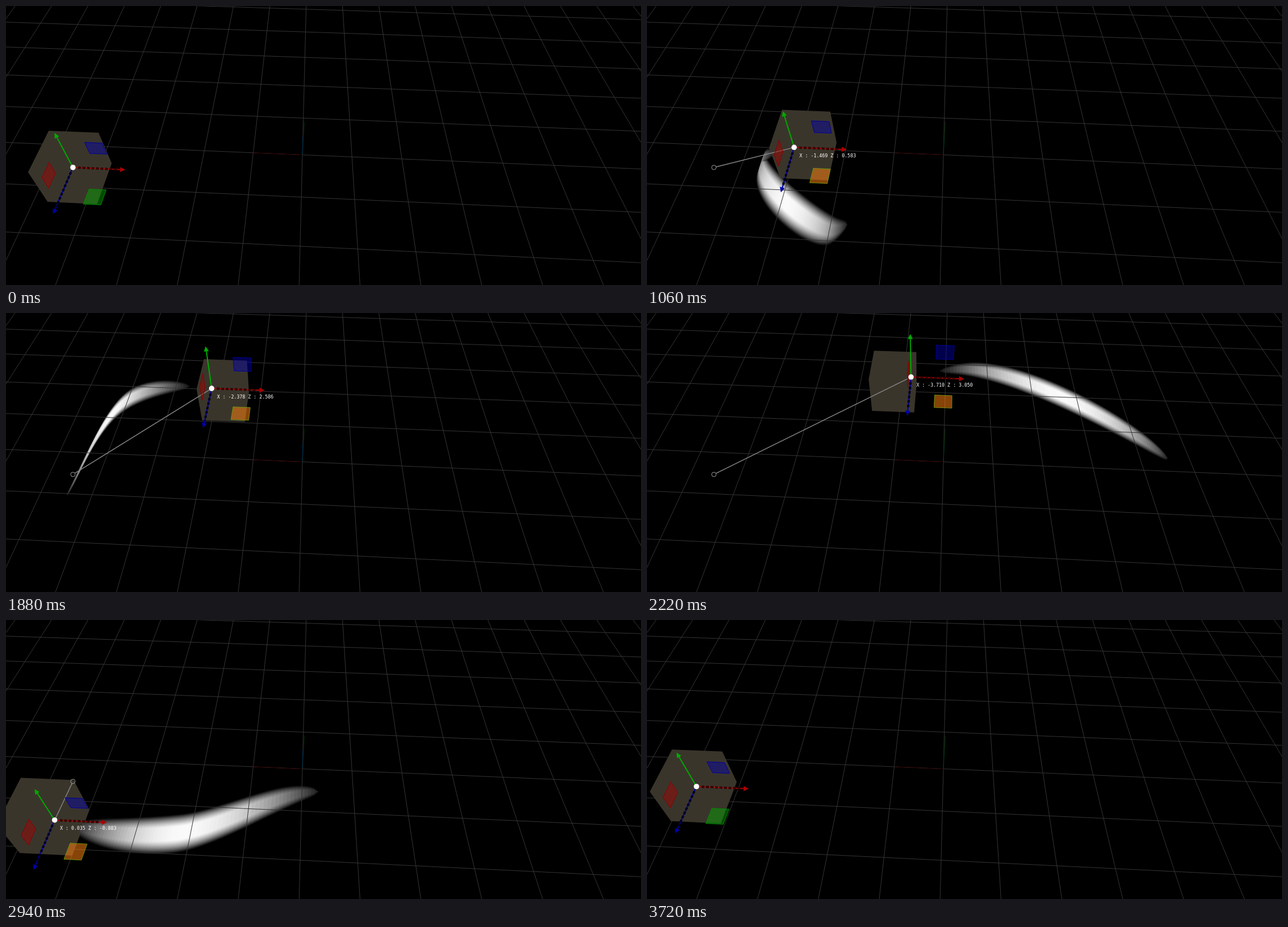
An HTML page with a canvas that plays this animation: 1129 px wide and 496 px high, repeating every 4.38 s.

```html
<!DOCTYPE html>
<html lang="en">
<head>
<meta charset="utf-8">
<title>Dragging a cube</title>
<style>
html, body { margin: 0; width: 100%; height: 100%; overflow: hidden; background: #000; }
canvas { display: block; }
</style>
</head>
<body>
<canvas id="stage" width="1129" height="496"></canvas>
<script>
const ctx = document.getElementById('stage').getContext('2d');
const LOOP = 4380, GRAB = 500, DROP = 3720;
const LEAD = 8, TRAIL_FROM = 15, TRAIL_TO = 150;

// Camera: screen centre, focal length, and world axes in camera space
const CX = 487, CY = 192, FOCAL = 851.5;
const ORIGIN = [.4541, .824, 9.665];
const RIGHT = [.9951, .0387, -.0347];
const UP = [.0006, -.6764, -.7365];
const FAR = [.0518, -.7355, .6756];
const START = [-4.5317, -.5515];

// Turning points of the drag: time, shift right, shift away from the viewer
const KEYS = [
  [500, 0, 0], [570, -.2, 1.87], [630, .45, 2.5], [720, 2.726, 1.997],
  [810, 3.6, .7], [930, 2.6, -1.24], [1040, 1.04, .4], [1240, 7.98, 1.64],
  [1320, 8.27, .7], [1380, 8.198, -.296], [1480, 6.3, -1.1], [1660, .05, -.84],
  [1730, .05, -.455], [1815, .51, 2.09], [1880, 2.378, 2.586], [2050, 9.1, .7],
  [2190, 5, 3.4], [2320, -.9, .5], [2390, -1.19, 1.34], [2480, 1.9, 1.5],
  [2540, 4.736, -.093], [2670, 8.2, -.7], [2790, 4.84, .01], [2860, 2.3, -1.03],
  [2940, -.035, -.883], [3010, -.8, 0], [3210, 7, 2.9], [3320, 9.6, 1.5],
  [3430, 6.3, -1.3], [3590, 0, -.73], [3720, -.3, -.138]
];

function depthAt(r, u, f) {
  return ORIGIN[2] + r * RIGHT[2] + u * UP[2] + f * FAR[2];
}

function project(r, u, f) {
  const axis = i => ORIGIN[i] + r * RIGHT[i] + u * UP[i] + f * FAR[i];
  const scale = FOCAL / depthAt(r, u, f);
  return [CX + axis(0) * scale, CY + axis(1) * scale];
}

// Smooth curve through the keys, with speed taken from the neighbours
function shiftAt(t) {
  const last = KEYS.length - 1;
  if (t <= GRAB) return [0, 0];
  if (t >= DROP) return KEYS[last].slice(1);
  const i = KEYS.findIndex(k => k[0] > t) - 1;
  const p = KEYS[i], q = KEYS[i + 1];
  const before = KEYS[Math.max(0, i - 1)], after = KEYS[Math.min(last, i + 2)];
  const span = q[0] - p[0], s = (t - p[0]) / span;
  return [1, 2].map(c => {
    const m0 = (q[c] - before[c]) / (q[0] - before[0]) * span;
    const m1 = (after[c] - p[c]) / (after[0] - p[0]) * span;
    const d = q[c] - p[c];
    return p[c] + s * (m0 + s * (3 * d - 2 * m0 - m1 + s * (m0 + m1 - 2 * d)));
  });
}

function placeAt(t) {
  const [r, f] = shiftAt(t);
  return [START[0] + r, START[1] + f];
}

function line(a, b, color, width = 1, dash = []) {
  ctx.strokeStyle = color;
  ctx.lineWidth = width;
  ctx.setLineDash(dash);
  ctx.beginPath();
  ctx.moveTo(...a);
  ctx.lineTo(...b);
  ctx.stroke();
  ctx.setLineDash([]);
}

function polygon(points) {
  const path = new Path2D();
  points.forEach(p => path.lineTo(...p));
  path.closePath();
  return path;
}

function drawGrid() {
  for (let i = -12; i <= 13; i++) line(project(i, 0, -4), project(i, 0, 7), '#353535');
  for (let i = -4; i <= 7; i++) line(project(-12, 0, i), project(13, 0, i), '#353535');
  const o = project(0, 0, 0);
  line(o, project(-1, 0, 0), '#300');
  line(o, project(0, 1, 0), '#030');
  line(o, project(0, 0, .48), '#002a58');
}

function cubeOutline([r, f]) {
  const outline = new Path2D();
  const ring = [[-.5, -.5], [.5, -.5], [.5, .5], [-.5, .5]];
  for (let axis = 0; axis < 3; axis++) for (const side of [-.5, .5]) {
    const face = ring.map(corner => {
      const v = [...corner];
      v.splice(axis, 0, side);
      return project(r + v[0], v[1], f + v[2]);
    });
    const [a, b, , d] = face;
    const turn = (b[0] - a[0]) * (d[1] - a[1]) - (b[1] - a[1]) * (d[0] - a[0]);
    outline.addPath(polygon(turn < 0 ? face.reverse() : face));
  }
  return outline;
}

// Glowing ribbon lying on the ground along the recent path; nearer than `limit` only
function drawTrail(t, limit = Infinity) {
  const steps = 70, layers = 20, samples = [];
  for (let i = 0; i <= steps; i++) {
    const age = i / steps, swell = Math.sin(Math.PI * age);
    const [r, f] = placeAt(t - TRAIL_FROM - age * (TRAIL_TO - TRAIL_FROM));
    samples.push({ r, f, half: .4 * Math.sqrt(swell), glow: .12 + .88 * swell });
  }
  ctx.lineWidth = .6;
  for (let j = 0; j < layers; j++) {
    const q = 1 - j / layers;
    const soft = Math.min(1, 1.1 * (1 - q * q) + .05);
    for (let i = 0; i < steps; i++) {
      const a = samples[i], b = samples[i + 1];
      if (a.f > limit) continue;
      const v = Math.round(250 * soft * a.glow);
      const quad = polygon([
        project(a.r, 0, a.f + a.half * q), project(b.r, 0, b.f + b.half * q),
        project(b.r, 0, b.f - b.half * q), project(a.r, 0, a.f - a.half * q)
      ]);
      ctx.fillStyle = ctx.strokeStyle = `rgb(${v},${v},${v})`;
      ctx.fill(quad);
      ctx.stroke(quad);
    }
  }
}

function arrow(from, tip, color, dark) {
  const dx = tip[0] - from[0], dy = tip[1] - from[1], len = Math.hypot(dx, dy);
  const x = dx / len, y = dy / len;
  const at = (d, side = 0) => [from[0] + x * d - y * side, from[1] + y * d + x * side];
  line(from, at(len - 8), color, 2);
  if (dark) line(at(9), at(len - 14), dark, 4, [5, 3]);
  ctx.fillStyle = color;
  ctx.fill(polygon([tip, at(len - 9, 4.5), at(len - 9, -4.5)]));
}

function drawGizmo([r, f], active) {
  const size = .111 * depthAt(r, 0, f);
  const at = (a, b, c) => project(r + a * size, b * size, f + c * size);
  const lo = .46, hi = .775;
  const square = [[lo, lo], [hi, lo], [hi, hi], [lo, hi]];
  const plane = (corner, fill, edge) => {
    const path = polygon(square.map(corner));
    ctx.fillStyle = fill;
    ctx.fill(path);
    ctx.strokeStyle = edge;
    ctx.lineWidth = 1;
    ctx.stroke(path);
  };
  plane(([a, b]) => at(0, a, -b), 'rgba(170,0,0,.45)', '#800');
  plane(([a, b]) => at(a, b, 0), 'rgba(0,0,170,.45)', '#00009a');
  plane(([a, b]) => at(a, 0, -b), active ? 'rgba(255,128,16,.53)' : 'rgba(0,170,0,.45)',
    active ? '#6a9010' : '#008c00');
  const c = at(0, 0, 0);
  arrow(c, at(1, 0, 0), '#a00', '#300');
  arrow(c, at(0, 0, -1), '#00a', '#002');
  arrow(c, at(0, 1, 0), '#0a0');
  ctx.fillStyle = '#fff';
  ctx.beginPath();
  ctx.arc(...c, 4.8, 0, 7);
  ctx.fill();
}

// Ring at the start of the drag, joined to the handle
function drawTether(place) {
  const a = project(START[0], 0, START[1]), b = project(place[0], 0, place[1]);
  const len = Math.hypot(b[0] - a[0], b[1] - a[1]);
  ctx.strokeStyle = '#999';
  ctx.lineWidth = 1;
  ctx.beginPath();
  ctx.arc(...a, 4, 0, 7);
  ctx.stroke();
  if (len > 4) {
    const s = 4 / len;
    line([a[0] + (b[0] - a[0]) * s, a[1] + (b[1] - a[1]) * s], b, '#888', 1.4);
  }
}

function drawLabel(t, place) {
  const [x, y] = project(place[0], 0, place[1]);
  const [r, f] = shiftAt(t);
  ctx.font = '8.33px "DejaVu Sans Mono", monospace';
  ctx.fillStyle = '#fff';
  ctx.fillText(`X : ${(-r).toFixed(3)} Z : ${f.toFixed(3)}`, x + 9.5, y + 17.5);
}

function draw(now) {
  const t = Math.floor(now % LOOP / 20) * 20;
  const dragging = t >= GRAB && t < DROP;
  const handle = placeAt(t);
  const body = dragging ? placeAt(t + LEAD) : handle;
  ctx.fillStyle = '#000';
  ctx.fillRect(0, 0, 1129, 496);
  if (dragging) drawTrail(t);
  drawGrid();
  const cube = cubeOutline(body);
  ctx.fillStyle = '#3a352b';
  ctx.fill(cube);
  if (dragging) {
    ctx.save();
    ctx.clip(cube);
    ctx.globalCompositeOperation = 'lighten';
    drawTrail(t, body[1] - .2);
    ctx.restore();
    drawTether(handle);
  }
  drawGizmo(handle, dragging);
  if (dragging) drawLabel(t, handle);
}

const begin = performance.now();
function tick() {
  draw(performance.now() - begin);
  requestAnimationFrame(tick);
}
tick();
</script>
</body>
</html>
```
